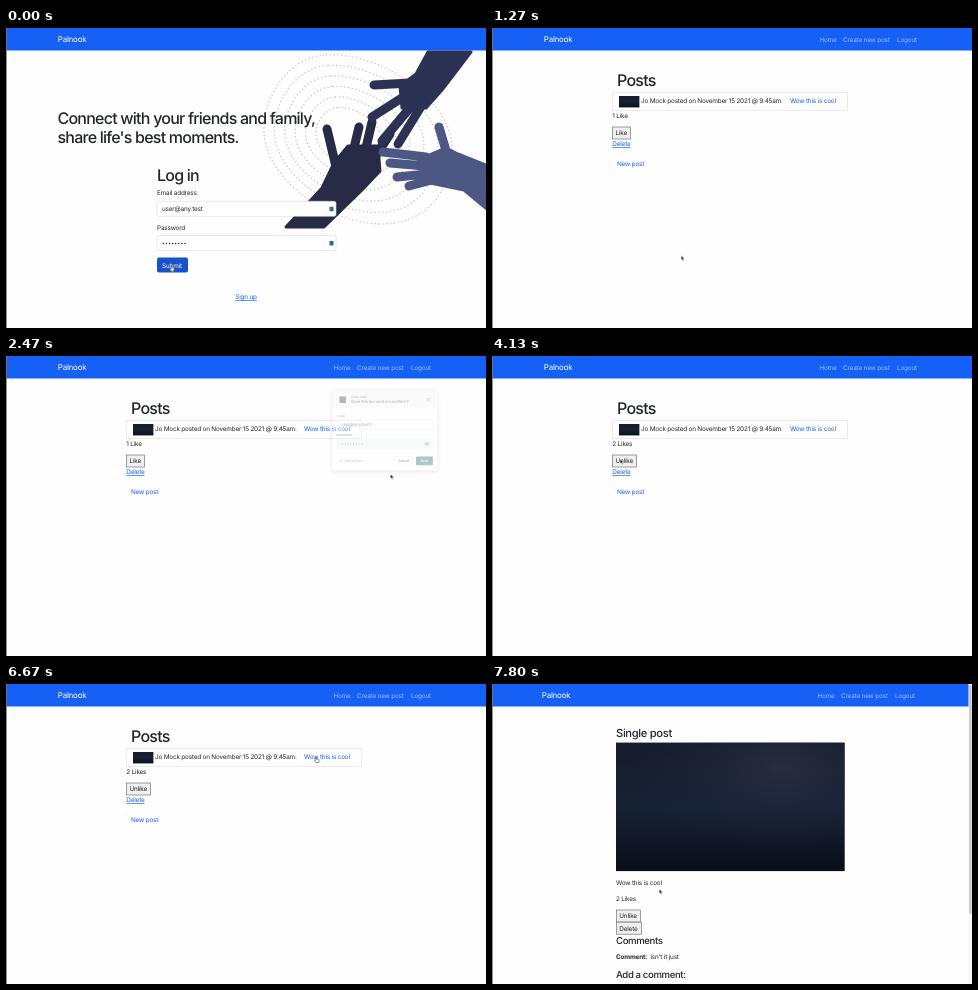
These frames come from a looping animation (480 px wide and 300 px high, 8000 ms). An HTML page:

```html
<!DOCTYPE html>
<html lang="en">
<head>
<meta charset="utf-8">
<title>Social app demo</title>
<style>
html, body { margin: 0; width: 100%; height: 100%; overflow: hidden; background: #fefefe; }
svg { display: block; width: 480px; height: 300px; }
text { font: 400 6.4px Inter, sans-serif; font-optical-sizing: none; letter-spacing: -.03em; fill: #212529; text-rendering: geometricPrecision; }
.h1 { font-size: 16px; font-weight: 500; letter-spacing: -.048em; }
.h3 { font-size: 11.2px; font-weight: 500; }
.h4 { font-size: 9.6px; font-weight: 500; letter-spacing: -.04em; }
.brand { font-size: 8px; fill: #fff; }
.nav text { fill: #fff; fill-opacity: .58; }
.link { fill: #1460e8; }
.u { text-decoration: underline; }
.white { fill: #fff; }
.bold { font-weight: 700; }
.cap { font-size: 3.9px; letter-spacing: .01em; }
.small { font-size: 5px; }
.field { fill: #fff; stroke: #d5d9de; stroke-width: .6; }
.btn { fill: #efefef; stroke: #767676; stroke-width: .7; }
.dots { stroke: #222; stroke-linecap: round; stroke-width: 1.5; fill: none; }
.line { fill: none; stroke: #33424a; stroke-width: .8; stroke-linecap: round; }
.hand { stroke-width: 9; stroke-linecap: round; stroke-linejoin: round; }
.hand path + path { fill: none; }
.hand path:first-child { stroke-width: 3; }
#rings path { fill: none; stroke: #c3c3c8; stroke-width: 1.5; stroke-linecap: round; stroke-dasharray: 0 3.8; vector-effect: non-scaling-stroke; }
#dialog { transform-origin: 378.5px 74.5px; }
#panel { filter: drop-shadow(0 1px 3px rgba(0, 0, 0, .32)); }
</style>
</head>
<body>
<svg viewBox="0 0 480 300">
  <defs>
    <linearGradient id="night" x2="0" y2="1">
      <stop stop-color="#151c2b"/><stop offset=".5" stop-color="#182235"/><stop offset="1" stop-color="#090d18"/>
    </linearGradient>
    <radialGradient id="glow" cx=".72" cy=".2" r=".65">
      <stop stop-color="#2b3043" stop-opacity=".85"/><stop offset="1" stop-color="#1a2438" stop-opacity="0"/>
    </radialGradient>
  </defs>
  <rect width="480" height="300" fill="#fefefe"/>
  <rect width="480" height="22.5" fill="#1560f5"/>

  <g id="login">
    <g id="rings"></g>
    <g class="hand" fill="#272b46" stroke="#272b46">
      <path d="M280 199 L318 199 L356 162 L374 143 L372 118 L342 118 L328 135 L316 160Z"/>
      <path d="M331 143 L321 101 M347 124 L353 99 M359 124 L366 94 M367 132 L384 106"/>
    </g>
    <g class="hand" fill="#4c5784" stroke="#4c5784">
      <path d="M482 138 L482 182 L458 162 L424 155 L412 132 L440 120 L452 126Z"/>
      <path d="M420 129 L377 124 M419 138 L384 135 M421 146 L391 149 M426 152 L403 158 M441 126 L433 99"/>
    </g>
    <g class="hand" fill="#2c3253" stroke="#2c3253">
      <path d="M422 24 L465 24 L436 62 L420 80 L396 80 L394 58 L410 46Z"/>
      <path d="M404 55 L368 57 M402 66 L366 89 M408 75 L376 113 M416 77 L392 116"/>
    </g>
    <text class="h1" x="51.5" y="95.5">Connect with your friends and family,</text>
    <text class="h1" x="51.5" y="114.7">share life's best moments.</text>
    <text class="h1" x="151" y="153.3">Log in</text>
    <text x="151" y="167">Email address</text>
    <rect class="field" x="151" y="173.3" width="179" height="15" rx="2"/>
    <text x="156" y="183.2">user@any.test</text>
    <text x="151" y="201.7">Password</text>
    <rect class="field" x="151" y="207.7" width="179" height="15" rx="2"/>
    <path class="dots" d="M157.3 215.6H180" stroke-dasharray="0 3.1"/>
    <path d="M323.5 178.7h4v4.6h-4zM323.5 213h4v4.6h-4z" fill="#2f6f8c"/>
    <rect id="ring" x="149.2" y="227.7" width="34.6" height="18.6" rx="3.5" fill="#8ab2fb"/>
    <rect id="submit" x="151" y="229.5" width="31" height="15" rx="2" fill="#1a52cc"/>
    <text class="white" x="156" y="239.5">Submit</text>
    <text class="link u" x="229.3" y="271">Sign up</text>
  </g>

  <g id="posts">
    <text class="h1" x="125" y="57.8">Posts</text>
    <rect id="card" x="120.4" y="64.5" width="235.3" height="18" fill="none" stroke="#dcdfe2" stroke-width=".6"/>
    <rect id="thumb" x="127" y="68" width="20.4" height="11.4" fill="url(#night)"/>
    <text x="149" y="75.3">Jo Mock posted on November 15 2021 @ 9:45am:</text>
    <text class="link" x="298" y="75.3">Wow this is cool</text>
    <g id="below">
      <g id="before">
        <text x="120.3" y="90">1 Like</text>
        <rect id="like" class="btn" x="120.6" y="99" width="18" height="12"/>
        <text x="123.5" y="107.3">Like</text>
      </g>
      <g id="after">
        <text x="120.3" y="90">2 Likes</text>
        <rect class="btn" x="120.6" y="99" width="24" height="12"/>
        <text x="123.5" y="107.3">Unlike</text>
      </g>
      <text class="link u" x="120.3" y="118.3">Delete</text>
      <text class="link" x="125" y="137.5">New post</text>
    </g>
  </g>

  <g id="single">
    <text class="h3" x="124" y="53">Single post</text>
    <rect x="124" y="58.6" width="228.7" height="128.5" fill="url(#night)"/>
    <rect x="124" y="58.6" width="228.7" height="128.5" fill="url(#glow)"/>
    <text x="124" y="200.8">Wow this is cool</text>
    <text x="124" y="217">2 Likes</text>
    <rect class="btn" x="124.4" y="226" width="24" height="12"/>
    <text x="127.3" y="234.3">Unlike</text>
    <rect class="btn" x="124.4" y="238.2" width="25" height="12"/>
    <text x="127.3" y="246.5">Delete</text>
    <text class="h4" x="124" y="259.8">Comments</text>
    <text class="bold" x="124" y="275.2">Comment:</text>
    <text x="158.5" y="275.2">isn't it just</text>
    <text class="h4" x="124" y="293.6">Add a comment:</text>
    <rect x="476.5" width="3.5" height="300" fill="#f8f8f8"/>
    <rect x="477.3" y="1" width="2.2" height="229" rx="1.1" fill="#c2c2c2"/>
  </g>

  <g id="bar">
    <text class="brand" x="51.8" y="14.4">Palnook</text>
    <g id="menu" class="nav">
      <text x="327.4" y="14">Home</text>
      <text x="351" y="14">Create new post</text>
      <text x="405" y="14">Logout</text>
    </g>
  </g>

  <g id="dialog">
    <rect id="panel" x="302.3" y="16.5" width="153" height="116" rx="3" fill="#fff"/>
    <path d="M302.3 41.5V19.5q0-3 3-3h147q3 0 3 3v22z" fill="#f3f3f4"/>
    <rect x="313" y="25" width="9.5" height="9.5" fill="#143a44"/>
    <text class="cap" x="329.5" y="27.3">LOCALHOST</text>
    <text x="329.3" y="34.4" style="font-size:6.2px">Save this account in Lockfern?</text>
    <path class="line" d="M440.2 27.2l4.6 4.6m0-4.6l-4.6 4.6"/>
    <text class="cap" x="308.6" y="54.4">LOGIN</text>
    <rect class="field" x="308.6" y="58.6" width="140" height="14.4" rx="1.5"/>
    <text x="315.6" y="68.2">user@any.test</text>
    <path class="line" d="M358.7 62.7v6"/>
    <text class="cap bold" x="308.6" y="83" style="fill:#175565">PASSWORD</text>
    <rect x="308.6" y="85.8" width="140" height="16.4" rx="1.5" fill="#eef0f3"/>
    <path class="dots" d="M317 94.2H347" stroke-dasharray="0 4.1"/>
    <path class="line" d="M437.5 94q3-4.4 6 0q-3 4.4-6 0z"/>
    <circle cx="440.5" cy="94" r="1.1" fill="#33424a"/>
    <path class="line" d="M313.7 117.8l2.1 2.1 2.1-2.1"/>
    <text class="small" x="321.4" y="120.8" style="fill:#4c585e">Show more</text>
    <rect class="field" x="391.5" y="112.3" width="29.2" height="12.8" rx="1.5"/>
    <text class="small" x="398.2" y="120.5" style="font-weight:600">Cancel</text>
    <rect x="424.3" y="112.3" width="24.5" height="12.8" rx="1.5" fill="#17606d"/>
    <text class="small white" x="430.8" y="120.5" style="font-weight:600">Save</text>
  </g>

  <rect width=".8" height="300" fill="#777"/>
  <g id="cursor" stroke="#fff" stroke-width=".5" stroke-linejoin="round" fill="#111">
    <path id="arrow" d="M0 0V4.6L1.1 3.7 1.9 5.4 2.8 5 2 3.4H3.4Z"/>
    <path id="pointer" d="M-.6 .5Q0-.3 .5 .5V2L2.5 2.5Q3.1 2.8 2.9 3.6L2.3 5.7H-.3L-1.8 3.6Q-1.9 2.7-.6 3.3Z" fill="#fff" stroke="#111"/>
  </g>
</svg>
<script>
const LOOP = 8000;
const $ = id => document.getElementById(id);

// steps: [time, properties, easing towards the next step]
function play(id, steps, easing = 'linear') {
  const rows = [...steps];
  if (rows[0][0] > 0) rows.unshift([0, rows[0][1]]);
  const last = rows[rows.length - 1];
  if (last[0] < LOOP) rows.push([LOOP, last[1]]);
  $(id).animate(
    rows.map(([t, props, ease]) => ({ offset: t / LOOP, easing: ease || easing, ...props })),
    { duration: LOOP, iterations: Infinity });
}
const hold = (id, steps) => play(id, steps, 'steps(1, end)');

function show(id, ...spans) {
  const steps = [[0, { opacity: 0 }]];
  for (const [from, to] of spans) {
    if (from === 0) steps.pop();
    steps.push([from, { opacity: 1 }]);
    if (to < LOOP) steps.push([to, { opacity: 0 }]);
  }
  hold(id, steps);
}

const egg = 'M318 27C282 30 256 70 258 105C260 150 320 195 375 196C420 196 445 165 446 120C446 70 370 22 318 27Z';
$('rings').innerHTML = [1, .87, .74, .61, .48, .35]
  .map(s => `<path d="${egg}" transform="translate(338 108) scale(${s}) translate(-338 -108)"/>`).join('');

const LOADED = 930, LIKED = 4130, OPENED = 6800;
show('login', [0, 870]);
show('posts', [870, OPENED]);
show('single', [OPENED, LOOP]);
show('menu', [870, LOOP]);
show('thumb', [LOADED, LOOP]);
show('before', [0, LIKED]);
show('after', [LIKED, LOOP]);
show('arrow', [1130, 6330], [6860, LOOP]);
show('pointer', [0, 1130], [6330, 6860]);

play('ring', [[70, { opacity: 0 }], [270, { opacity: 1 }]]);
play('submit', [[70, { fill: '#1a52cc' }], [200, { fill: '#174ab8' }], [400, { fill: '#1a52cc' }]]);
hold('card', [[0, { height: '16.5px' }], [LOADED, { height: '18px' }]]);
hold('below', [[0, { transform: 'translateY(-1.5px)' }], [LOADED, { transform: 'none' }]]);
hold('like', [[0, { fill: '#efefef' }], [3800, { fill: '#dcdcdc' }], [3930, { fill: '#efefef' }]]);
hold('bar', [[0, { transform: 'none' }], [OPENED, { transform: 'translateX(-2px)' }]]);

const zoom = (t, s, opacity) => [t, { transform: `scale(${s})`, opacity }];
play('dialog', [
  zoom(1350, .6, 0), zoom(1550, 1, 1), zoom(2335, 1, 1), zoom(2470, .69, .35), zoom(2600, .4, 0)
]);

const at = (t, x, y, ease) => [t, { transform: `translate(${x}px, ${y}px)` }, ease];
play('cursor', [
  at(0, 165.5, 237.5), at(1100, 165.5, 237.5), at(1900, 418.5, 129.5), at(2100, 418.5, 129.5),
  at(2250, 404, 119), at(2330, 404, 119, 'linear'), at(2470, 384.5, 118, 'linear'),
  at(2600, 370, 117), at(3400, 131, 111), at(3800, 131, 111), at(3930, 128.3, 103),
  at(4600, 128.3, 103), at(5400, 200, 140), at(5530, 200, 140), at(6330, 305, 76),
  at(6450, 310.3, 73), at(6860, 310.3, 73), at(7200, 320, 100), at(7270, 320, 100), at(7800, 167.3, 205)
], 'ease-in-out');
</script>
</body>
</html>
```
